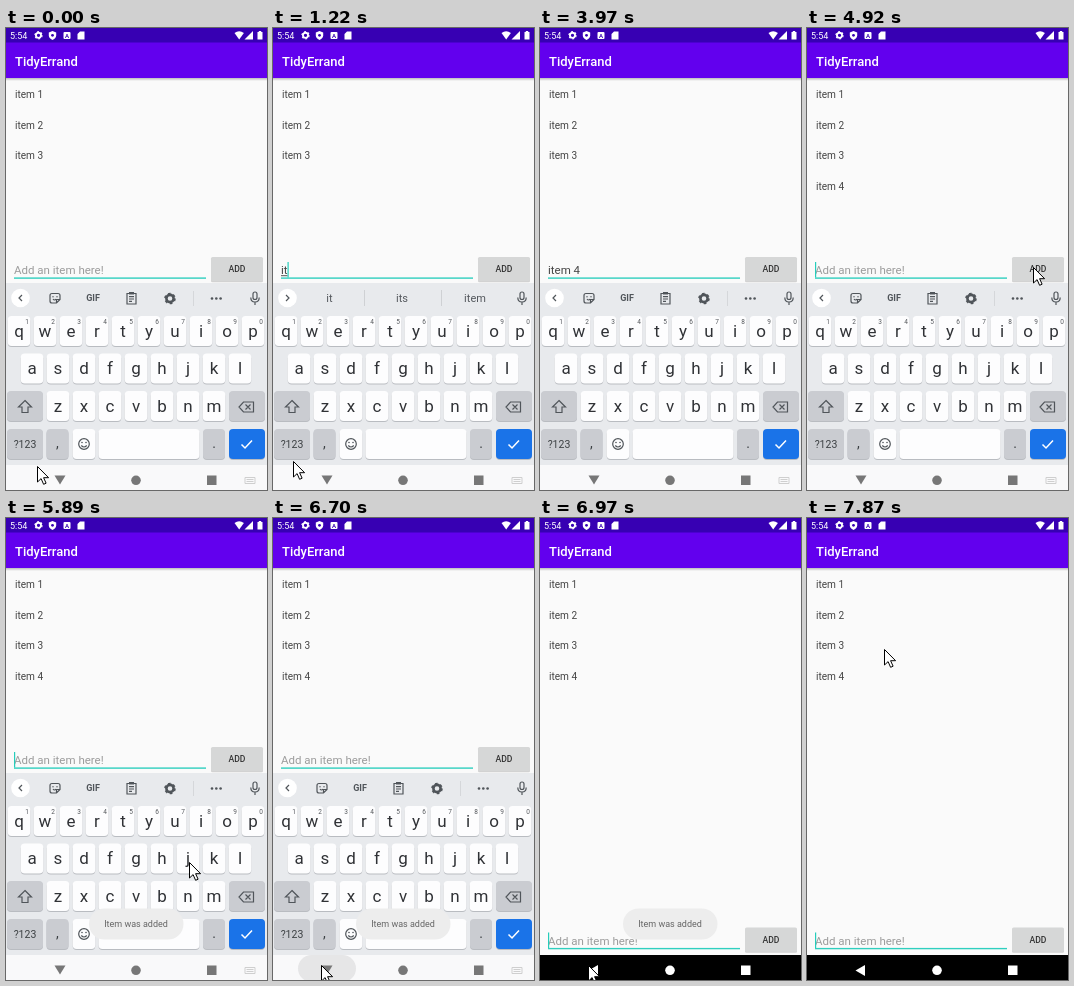
Animation of 261x462 px, one loop 7990 ms. Source, as an HTML page:

```html
<!DOCTYPE html>
<html lang="en">
<head>
<meta charset="utf-8">
<title>Task list</title>
<style>
  html, body { margin: 0; width: 100%; height: 100%; overflow: hidden; background: #fafafa; }
  svg { display: block; width: 100%; height: 100%; font-family: Roboto, sans-serif; }
  .mid { text-anchor: middle; }
  .line { fill: none; stroke: #50555a; stroke-width: 1.2; }
  .key { fill: #fdfdfe; }
  .alt { fill: #caccd1; }
  .shade { fill: #b9bcc1; }
  .letter { font-size: 17px; fill: #303236; }
  .digit { font-size: 6.5px; fill: #55585c; }
  .word { font-size: 11px; fill: #55595e; }
</style>
</head>
<body>
<svg viewBox="0 0 261 462" preserveAspectRatio="none">
  <defs>
    <linearGradient id="drop" x2="0" y2="1">
      <stop stop-color="#000" stop-opacity=".25"/>
      <stop offset="1" stop-color="#000" stop-opacity="0"/>
    </linearGradient>
    <clipPath id="aboveNav"><rect width="261" height="437"/></clipPath>
    <g id="gear">
      <circle r="3.6" fill="none" stroke="currentColor" stroke-width="2.6"/>
      <circle r="5" fill="none" stroke="currentColor" stroke-width="1.6" stroke-dasharray="2.6 2.636"/>
    </g>
  </defs>

  <rect width="261" height="462" fill="#fafafa"/>
  <rect y="50" width="261" height="3" fill="url(#drop)"/>
  <rect y="14" width="261" height="36" fill="#6200ee"/>
  <rect width="261" height="14.5" fill="#3700b3"/>
  <text x="9" y="38" font-size="13" font-weight="500" fill="#fff">TidyErrand</text>

  <g fill="#fff" color="#fff">
    <text x="4" y="10.5" font-size="9">5:54</text>
    <use href="#gear" transform="translate(32.5 7.3) scale(.72)"/>
    <path d="M46.500 3l3.700 1.500v2.800q0 3-3.700 4.700q-3.700-1.700-3.700-4.700v-2.800z"/>
    <circle cx="46.500" cy="7.300" r="1.400" fill="#3700b3"/>
    <rect x="57.500" y="4" width="7" height="7" rx="1"/>
    <text class="mid" x="61" y="9.700" font-size="6" font-weight="700" fill="#3700b3">A</text>
    <path d="M74 3.500h4.500v8h-7v-5.500z"/>
    <path d="M228.500 5q4.700-3.400 9.400 0l-4.700 6.500z"/>
    <path d="M247 3v8.500h-8.500z"/>
    <path d="M251.500 4h1.300v-1h2.400v1h1.300v7.500h-5z"/>
  </g>

  <g id="items" font-size="10.1" fill="#454545"></g>

  <g id="form">
    <text id="hint" x="8" y="246" font-size="11.5" fill="#9c9c9c">Add an item here!</text>
    <text id="typed" x="8" y="246" font-size="11.5" fill="#454545"></text>
    <rect id="under" x="8" y="247.2" height="1" fill="#555"/>
    <rect x="8" y="249.4" width="192" height="1.4" fill="#30cfbf"/>
    <rect id="caret" y="234" width="1.2" height="15.5" fill="#25cdbb"/>
    <rect x="205" y="230" width="52" height="24.300" rx="1.500" fill="#b5b5b5" opacity=".6"/>
    <rect id="button" x="205" y="229" width="52" height="24.300" rx="1.500"/>
    <text class="mid" x="231" y="244.300" font-size="8.600" font-weight="500" fill="#333">ADD</text>
  </g>

  <g clip-path="url(#aboveNav)">
    <g id="board">
      <rect y="255" width="261" height="182" fill="#e8eaed"/>
      <circle cx="14.500" cy="270" r="9.300" fill="#fff"/>
      <path id="chevron" class="line"/>
      <g id="tools">
        <path class="line" d="M46 265.500h6q2 0 2 2v4l-3.500 3.500h-4.500q-2 0-2-2v-5.500q0-2 2-2zM54 271.500h-3.500v3.500M47 271q1.500 2 3 0"/>
        <circle cx="47" cy="268.700" r=".7" fill="#50555a"/>
        <circle cx="51" cy="268.700" r=".7" fill="#50555a"/>
        <text class="mid" x="87" y="273.200" font-size="9" font-weight="700" fill="#50555a">GIF</text>
        <path class="line" d="M121 265.500h9v10.500h-9zM123 268.700h5M123 271h5M123 273.300h3"/>
        <path d="M123 264h5v2.500h-5z" fill="#50555a"/>
        <use href="#gear" x="164" y="270.500" color="#50555a"/>
        <path d="M187.500 263v15" stroke="#d5d7da"/>
        <g fill="#50555a">
          <circle cx="206" cy="270.500" r="1.300"/><circle cx="210.300" cy="270.500" r="1.300"/><circle cx="214.600" cy="270.500" r="1.300"/>
        </g>
      </g>
      <g id="words">
        <path d="M91.500 262v16M168.500 262v16" stroke="#cfd1d4"/>
        <text class="word mid" x="56.500" y="274.300"></text>
        <text class="word mid" x="129" y="274.300"></text>
        <text class="word mid" x="202" y="274.300"></text>
      </g>
      <rect x="247" y="264" width="4" height="7.500" rx="2" class="line"/>
      <path class="line" d="M244.800 269.500q0 4.500 4.200 4.500t4.200-4.500M249 274v3"/>
      <g id="keys"></g>
      <path class="line" d="M19 372.500l6.500 6.500h-3.500v5.500h-6v-5.500h-3.500z"/>
      <path class="line" d="M237.500 374h10v10h-10l-4.500-5zM239.500 376.500l5 5M244.500 376.500l-5 5"/>
      <text class="mid" x="19" y="420" font-size="10.500" fill="#3c4043">?123</text>
      <text class="mid" x="51.500" y="420" font-size="14" fill="#3c4043">,</text>
      <text class="mid" x="208" y="420" font-size="14" fill="#3c4043">.</text>
      <circle class="line" cx="78" cy="416" r="5.300"/>
      <path class="line" d="M75.300 417.500q2.700 3 5.400 0"/>
      <circle cx="76" cy="414.500" r=".8" fill="#50555a"/>
      <circle cx="80" cy="414.500" r=".8" fill="#50555a"/>
      <path d="M235.500 416.500l3.500 3.500l7-7.500" fill="none" stroke="#fff" stroke-width="1.500"/>
    </g>
  </g>

  <g id="lightNav">
    <rect y="437" width="261" height="25" fill="#f9f9fa"/>
    <rect id="ripple" x="25" y="437" width="58" height="27" rx="13.500" fill="#e6e6e7"/>
    <g fill="#777">
      <path d="M48.500 447.500h11l-5.500 9z"/>
      <circle cx="130" cy="452.300" r="4.800"/>
      <rect x="201" y="447.500" width="9.500" height="9.500"/>
    </g>
    <path d="M239 449.500h10v6h-10zM240.500 451.500h7M240.500 453.500h7" fill="none" stroke="#cfcfcf"/>
  </g>
  <g id="darkNav" fill="#fff">
    <rect y="437" width="261" height="25" fill="#000"/>
    <path d="M58 447v11l-9.500-5.500z"/>
    <circle cx="130" cy="452.300" r="4.800"/>
    <rect x="201" y="447.500" width="9.500" height="9.500"/>
  </g>

  <g id="toast">
    <rect x="83" y="390.500" width="94.500" height="31" rx="15.500" fill="#ededed"/>
    <text class="mid" x="130" y="409.300" font-size="9" fill="#666">Item was added</text>
  </g>
  <path id="mouse" d="M.5 .5v15.500l3.600-3.400l2.500 5.700l2.500-1.100l-2.500-5.500h5z" fill="#fff" stroke="#000" stroke-linejoin="round"/>
</svg>

<script>
const LOOP = 7990;
const $ = id => document.getElementById(id);

function add(parent, tag, attrs, text = '') {
  const el = document.createElementNS('http://www.w3.org/2000/svg', tag);
  for (const name in attrs) el.setAttribute(name, attrs[name]);
  el.textContent = text;
  return parent.appendChild(el);
}

function key(x, y, width, cls, fill) {
  add($('keys'), 'rect', { x, y: y + 1, width, height: 30, rx: 4, class: 'shade' });
  const face = add($('keys'), 'rect', { x, y, width, height: 30, rx: 4, class: cls });
  if (fill) face.setAttribute('fill', fill);
}

[['qwertyuiop', 13, 288], ['asdfghjkl', 26, 325.5], ['zxcvbnm', 52, 363]].forEach(([row, left, y]) => {
  [...row].forEach((letter, i) => {
    const x = left + i * 26;
    key(x - 11.3, y, 22.6, 'key');
    add($('keys'), 'text', { x, y: y + 20.5, class: 'letter mid' }, letter);
    if (y === 288) add($('keys'), 'text', { x: x + 8, y: 296, class: 'digit mid' }, (i + 1) % 10);
  });
});
key(1, 363, 36, 'alt');
key(223, 363, 36, 'alt');
key(1, 401, 36, 'alt');
key(40.5, 401, 22, 'alt');
key(66.7, 401, 22.6, 'key');
key(92.5, 401, 101, 'key');
key(197, 401, 22, 'alt');
key(223, 401, 36, '', '#1a73e8');

const items = [1, 2, 3, 4].map(n =>
  add($('items'), 'text', { x: 9, y: 39.2 + n * 30.7 }, 'item ' + n));

// Each row is [start time, value, ...]; a value holds until the next row.
const mouse = [
  [0, 31, 438], [120, 28, 437], [280, 23, 434], [420, 20, 433], [3310, -50, 0],
  [4250, 250, 385], [4380, 241, 312], [4520, 230, 254], [4650, 226, 239],
  [5590, 222, 256], [5730, 206, 299], [5890, 183, 344], [6020, 141, 385],
  [6150, 102, 420], [6280, 75, 438], [6400, 57, 445], [6550, 48, 447],
  [7240, 53, 437], [7360, 64, 409], [7510, 74, 315], [7630, 79, 215],
  [7750, 79, 155], [7870, 77, 131]
];
const typed = [[0, ''], [1080, 'i'], [1210, 'it'], [1620, 'ite'], [1750, 'item'], [3150, 'item 4'], [4790, '']];
const under = [[0, 0], [1080, 2.8], [1210, 6.6], [1620, 12.7], [1750, 22.5], [2720, 0]];
const caret = [
  [0, 0], [420, 8], [950, 0], [1080, 11], [1210, 14.5], [1620, 20.7], [1750, 30.7],
  [2290, 0], [2440, 33], [3150, 40], [3970, 0], [4790, 8], [5310, 0], [5730, 8],
  [6280, 0], [6970, 8], [7510, 0], [7870, 8]
];
const words = [
  [0, ''], [1080, 'I', 'in', 'is'], [1210, 'it', 'its', 'item'], [1620, 'item', 'ite', 'items'],
  [1750, 'item', 'item1', 'items'], [2720, '1', '2', '3'], [3150, '']
];
const toast = [[0, 0], [5190, .25], [5310, .7], [5450, 1], [7120, .8], [7240, .35], [7360, 0]];
const slide = [[0, 0], [6850, 110], [6970, 190]];

const at = (table, t) => table.findLast(row => row[0] <= t).slice(1);
const show = (el, on) => el.setAttribute('visibility', on ? 'inherit' : 'hidden');
const move = (el, x, y) => el.setAttribute('transform', `translate(${x} ${y})`);

function render(t) {
  move($('mouse'), ...at(mouse, t));

  const [text] = at(typed, t);
  $('typed').textContent = text;
  show($('hint'), !text);
  $('under').setAttribute('width', at(under, t)[0]);
  const [x] = at(caret, t);
  show($('caret'), x);
  $('caret').setAttribute('x', x);
  $('button').setAttribute('fill', t >= 4650 && t < 4920 ? '#c5c6c6' : '#d6d7d7');
  show(items[3], t >= 4790);

  const list = at(words, t);
  const open = list[0] !== '';
  show($('words'), open);
  show($('tools'), !open);
  $('words').querySelectorAll('text').forEach((el, i) => el.textContent = list[i] || '');
  $('chevron').setAttribute('d', open ? 'M13 267l3 3l-3 3' : 'M16 267l-3 3l3 3');

  move($('form'), 0, t >= 6850 ? 180.5 : 0);
  move($('board'), 0, at(slide, t)[0]);
  show($('ripple'), t >= 6700 && t < 6970);
  show($('lightNav'), t < 6970);
  show($('darkNav'), t >= 6970);
  $('toast').setAttribute('opacity', at(toast, t)[0]);
}

const start = performance.now();
function tick() {
  render((performance.now() - start) % LOOP);
  requestAnimationFrame(tick);
}
tick();
</script>
</body>
</html>
```
